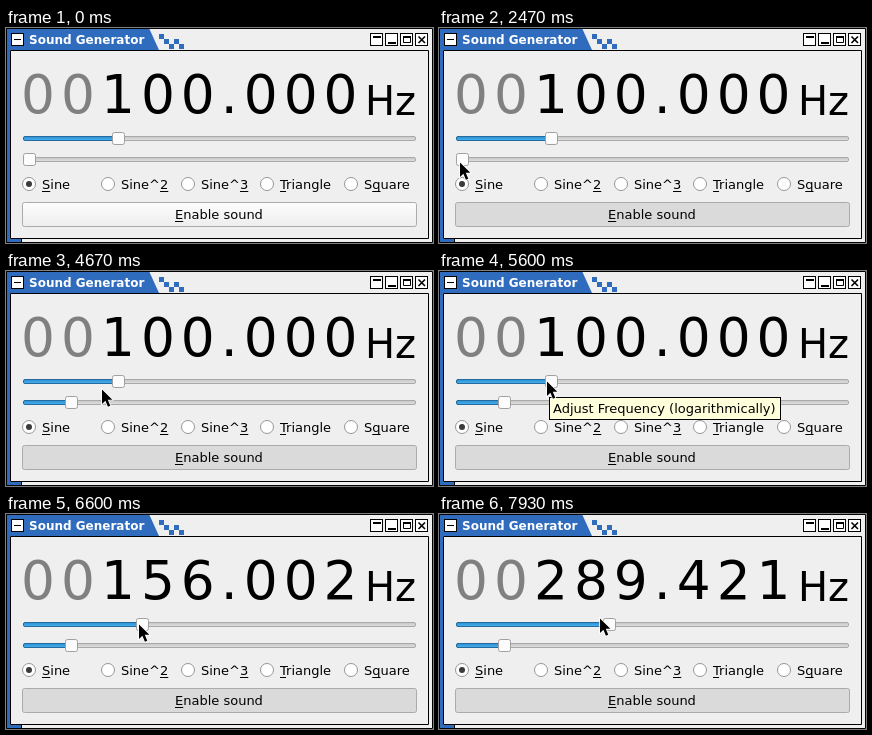
Write an HTML page that moves like this. It is 427 by 215 pixels and loops after 8 s.

```html
<!DOCTYPE html>
<html lang="en">
<head>
<meta charset="utf-8">
<title>Sound Generator</title>
<style>
  html, body { margin: 0; height: 100%; overflow: hidden; background: #efefef; }
  body { position: relative; font: 13px "DejaVu Sans", sans-serif; }
  svg, span, #tip { position: absolute; left: 0; top: 0; white-space: pre; }
  svg { width: 427px; height: 215px; }
  u { text-decoration: underline 1px; text-underline-offset: 2px; text-decoration-skip-ink: none; }
  #tip { box-sizing: border-box; height: 23px; padding: 3px; border: 1px solid #000; background: #ffffdc; }
  .title { left: 23px; top: 5px; font-weight: bold; font-size: 12px; color: #fff; }
  .digits { top: 35px; font-size: 53.33px; letter-spacing: 6px; }
  .unit { left: 359px; top: 50px; font-size: 40px; }
  .line { fill: none; stroke: #000; }
  .blue { fill: #306cbe; }
  .box { fill: #fff; stroke: #000; }
</style>
</head>
<body>
<svg viewBox="0 0 427 215">
  <defs>
    <linearGradient id="raised" x2="0" y2="1"><stop stop-color="#fdfdfd"/><stop offset="1" stop-color="#ededed"/></linearGradient>
    <linearGradient id="groove" x2="0" y2="1"><stop stop-color="#c6c6c6"/><stop offset="1" stop-color="#e0e0e0"/></linearGradient>
    <linearGradient id="filled" x2="0" y2="1"><stop stop-color="#2c8fd0"/><stop offset="1" stop-color="#4ab0ee"/></linearGradient>
  </defs>

  <path class="blue" d="M0 0H143L153 22H4V211H15V215H0Z
    M153 6h5v5h-5z M158 11h5v5h-5z M168 11h5v5h-5z M163 16h5v5h-5z M173 16h5v5h-5z"/>
  <path class="line" d="M.5 .5H426.5V214.5H.5Z M4.5 22.5H422.5V210.5H4.5Z M15.5 211V214"/>
  <g id="buttons"></g>
  <path class="line" d="M8 11.5h7"/>
  <path class="line" stroke-width="2" d="M367 9h8 M382 15h8 M397 9h8"/>
  <path class="line" d="M397.5 8.5h7v6h-7z"/>
  <path class="line" stroke-width="1.6" d="M412.5 8.5l6.5 6.5m0-6.5l-6.5 6.5"/>
  <g id="sliders"></g>
  <g id="radios"></g>
  <rect id="enable" x="16.5" y="174.5" width="394" height="24" rx="2" stroke="#ababab"/>
</svg>

<span class="title">Sound Generator</span>
<span class="digits" style="left: 15px; color: #808080">00</span>
<span class="digits" id="freq" style="left: 95px">100.000</span>
<span class="unit">Hz</span>
<div id="labels"></div>
<span style="left: 169px; top: 179px"><u>E</u>nable sound</span>

<div id="tip"></div>
<svg viewBox="0 0 427 215">
  <path id="mouse" d="M0 .5V15L3.4 11.8 5.9 17.7 8.3 16.7 5.8 10.8H10.4Z" stroke="#fff" stroke-width="1.6" paint-order="stroke"/>
</svg>
<script>
const $ = id => document.getElementById(id);
const LOOP = 8000, FPS = 15, RANGE = 380, LEFT = 17;

$('buttons').innerHTML = [5, 364, 379, 394, 409]
  .map(x => `<rect class="box" x="${x + .5}" y="5.5" width="12" height="12"/>`).join('');

$('sliders').innerHTML = [108, 129].map(y => `
  <rect x="17.5" y="${y + .5}" width="392" height="4" rx="1.5" fill="url(#groove)" stroke="#a9a9a9"/>
  <rect class="fill" x="17.5" y="${y + .5}" height="4" rx="1.5" fill="url(#filled)" stroke="#236c9f"/>
  <rect class="knob" y="${y - 3.5}" width="12" height="12" rx="2" fill="#fcfcfc" stroke="#a0a0a0"/>`).join('');

const waves = [[23, '<u>S</u>ine'], [102, 'Sine^<u>2</u>'], [182, 'Sine^<u>3</u>'],
  [261, '<u>T</u>riangle'], [345, 'S<u>q</u>uare']];
$('radios').innerHTML = waves.map(([x]) =>
  `<circle cx="${x}" cy="156" r="6.5" fill="#fff" stroke="#969696"/>`).join('') +
  '<circle cx="23" cy="156" r="3" fill="#3a3a3a"/>';
$('labels').innerHTML = waves.map(([x, label]) =>
  `<span style="left: ${x + 13}px; top: 149px">${label}</span>`).join('');

// Keys are [tick, ...values], at 15 ticks per second.
const mousePath = [[10, 206, 217], [17, 193, 188], [28, 193, 188], [32, 115, 163], [37, 21, 134],
  [54, 21, 134], [58, 36, 132], [63, 63, 132], [67, 63, 132], [71, 107, 113], [72, 107, 113],
  [73, 108, 110], [92, 108, 110], [99, 133, 110], [103, 145, 109], [104, 145, 109],
  [109, 166, 107], [117, 166, 107], [119, 161, 104]];
const pitchPath = [[92, 88.6], [99, 113], [103, 125], [104, 125], [109, 147]];
const volumePath = [[54, 0], [58, 11], [63, 42]];
const tips = [
  { from: 48, to: 54, x: 23, y: 150, width: 103, text: 'Adjust Volume' },
  { from: 84, to: 92, x: 110, y: 126, width: 232, text: 'Adjust Frequency (logarithmically)' }];

function at(keys, tick) {
  const next = keys.findIndex(k => k[0] > tick);
  if (next < 0) return keys[keys.length - 1].slice(1);
  if (!next) return keys[0].slice(1);
  const a = keys[next - 1], b = keys[next], part = (tick - a[0]) / (b[0] - a[0]);
  return a.slice(1).map((v, i) => v + (b[i + 1] - v) * part);
}

function setSlider(i, pos) {
  const fill = document.querySelectorAll('.fill')[i];
  fill.setAttribute('width', pos + 3);
  fill.style.display = pos ? '' : 'none';
  document.querySelectorAll('.knob')[i].setAttribute('x', LEFT + pos + .5);
}

function draw(time) {
  const tick = Math.floor(time % LOOP * FPS / 1000 + .06);
  const pitch = Math.round(at(pitchPath, tick)[0]);
  setSlider(0, pitch);
  setSlider(1, Math.round(at(volumePath, tick)[0]));

  const hertz = tick > 92 ? 20 * 10 ** (Math.round(pitch / RANGE * 30000) / 10000) : 100;
  $('freq').textContent = hertz.toFixed(3);
  $('enable').setAttribute('fill', tick < 18 ? 'url(#raised)' : '#dadada');

  const [x, y] = at(mousePath, tick).map(Math.round);
  $('mouse').setAttribute('transform', `translate(${x} ${y})`);

  const tip = tips.find(t => tick >= t.from && tick < t.to);
  $('tip').style.display = tip ? '' : 'none';
  if (tip) {
    Object.assign($('tip').style, { left: tip.x + 'px', top: tip.y + 'px', width: tip.width + 'px' });
    $('tip').textContent = tip.text;
  }
}

const start = performance.now();
(function loop() {
  draw(performance.now() - start);
  requestAnimationFrame(loop);
})();
</script>
</body>
</html>
```
